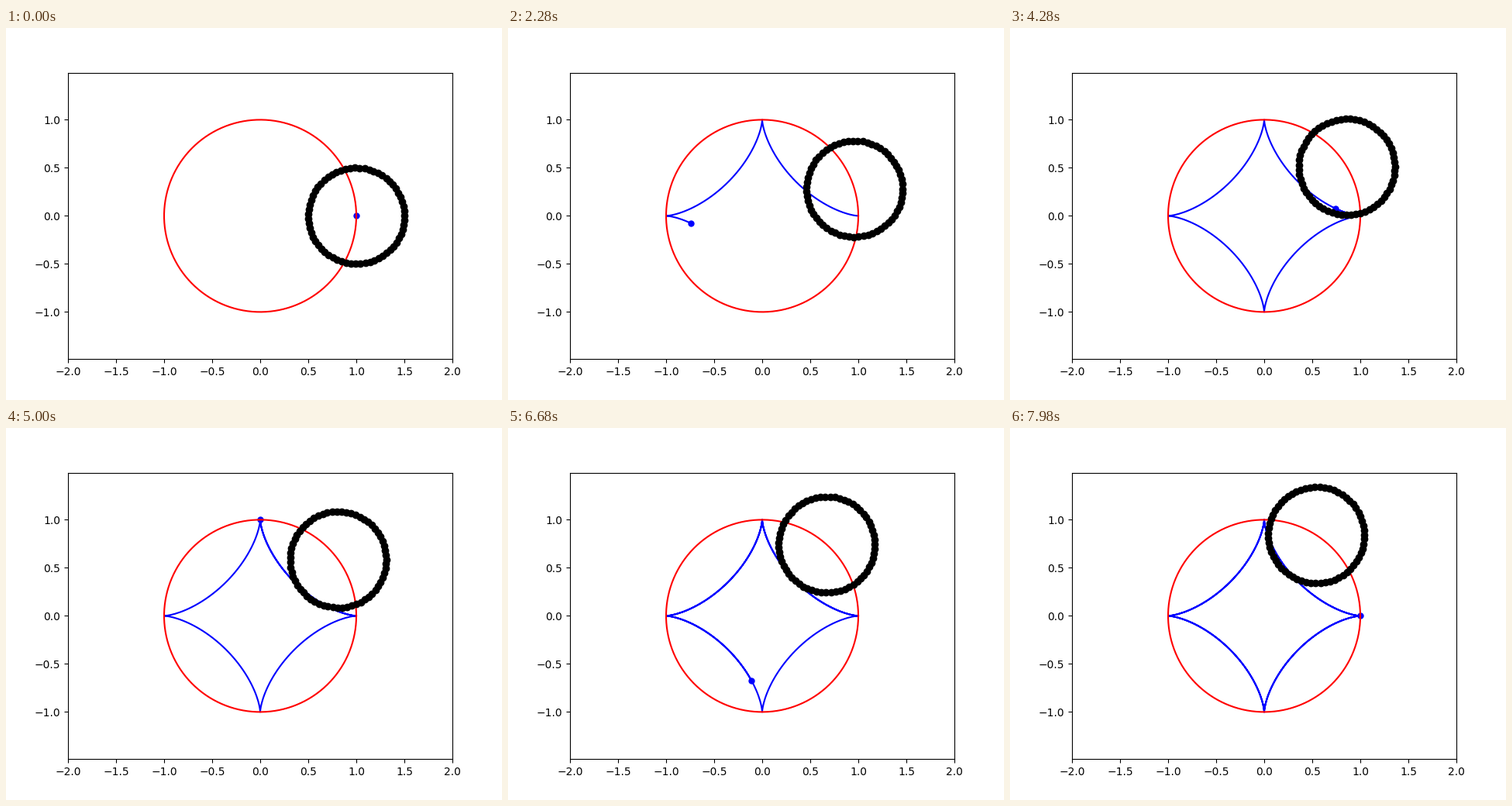
These frames come from a looping animation (640 px wide and 480 px high, 8 s). A matplotlib script:

```python
import numpy as np
import matplotlib.pyplot as plt
from matplotlib.animation import FuncAnimation

FRAMES = 400
INTERVAL = 20
UNIT = 124  # pixels per data unit on both axes

fig = plt.figure(figsize=(6.4, 4.8), dpi=100)
ax = fig.add_axes([0.125, 0.11, 0.775, 0.77])
half_height = 369.6 / UNIT / 2
ax.set_xlim(-2, 2)
ax.set_ylim(-half_height, half_height)

# Astroid traced twice per loop
t = np.arange(FRAMES) * 4 * np.pi / FRAMES
astroid_x, astroid_y = np.cos(t) ** 3, np.sin(t) ** 3

trace, = ax.plot([], [], "b-", lw=1.5)
tip, = ax.plot([], [], "bo", ms=5)

phi = np.linspace(0, 2 * np.pi, 400)
ax.plot(np.cos(phi), np.sin(phi), "r-", lw=1.5)

bead = np.arange(0, 2 * np.pi, 0.1)
ring_x, ring_y = 0.5 * np.cos(bead), 0.5 * np.sin(bead)
ring, = ax.plot([], [], "ko", ms=6)


def update(i):
    trace.set_data(astroid_x[:i + 1], astroid_y[:i + 1])
    tip.set_data([astroid_x[i]], [astroid_y[i]])
    angle = i / FRAMES  # the ring's centre covers one radian per loop
    ring.set_data(np.cos(angle) + ring_x, np.sin(angle) + ring_y)
    return trace, tip, ring


anim = FuncAnimation(fig, update, frames=FRAMES, interval=INTERVAL,
                     repeat=True, repeat_delay=0)
plt.show()
```
